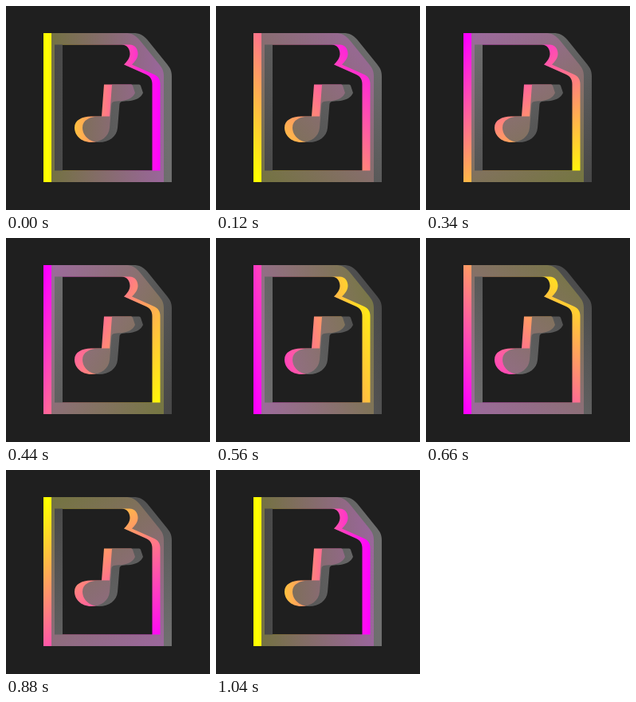
These frames come from a looping animation (256 px wide and 256 px high, 1060 ms). An HTML page:

```html
<!DOCTYPE html>
<html lang="en">
<head>
<meta charset="utf-8">
<title>Music file icon</title>
<style>
  @property --turn { syntax: "<angle>"; inherits: true; initial-value: 270deg; }

  html, body { margin: 0; width: 100%; height: 100%; overflow: hidden; background: #1f1f1f; }
  body { position: relative; animation: spin 1060ms linear infinite; }

  /* full turn, then one short hold before the loop restarts */
  @keyframes spin {
    0% { --turn: 270deg; }
    98.113%, 100% { --turn: -90deg; }
  }

  /* page outline, hole with folded corner, note */
  .icon {
    position: absolute; inset: 0; width: 256px; height: 256px;
    background: linear-gradient(var(--turn), var(--from) 3%, var(--to) 97%) 47px 34px / 151px 187px no-repeat;
    clip-path: path(evenodd,
      "M47 34H149.500C157.500 34 162.500 36.500 167.500 42.500L192.500 73.500C196 78 198 81.500 198 88V221H47Z \
      M61 48.500V206.500H183.500V98C183.500 92 181 88.500 176 86L148 73.500C152 69.500 155.500 65 155.500 60C155.500 54 152 48.500 145 48.500Z \
      M123 98.500H157Q158.500 98.500 159 100L162 109C159.500 115 153 118 146 119C139 119.500 133 119 132.500 123L130 153C129 164 119 171 107 171C94 171 86 162 86 152.500C86 143.500 95 138.500 107 138.500H120Z");
  }
  .neon { --from: #f0f; --to: #ff0; }
  .gray { --from: #838383; --to: #525252; left: 10px; opacity: .8; }
</style>
</head>
<body>
  <div class="icon neon"></div>
  <div class="icon gray"></div>
</body>
</html>
```
